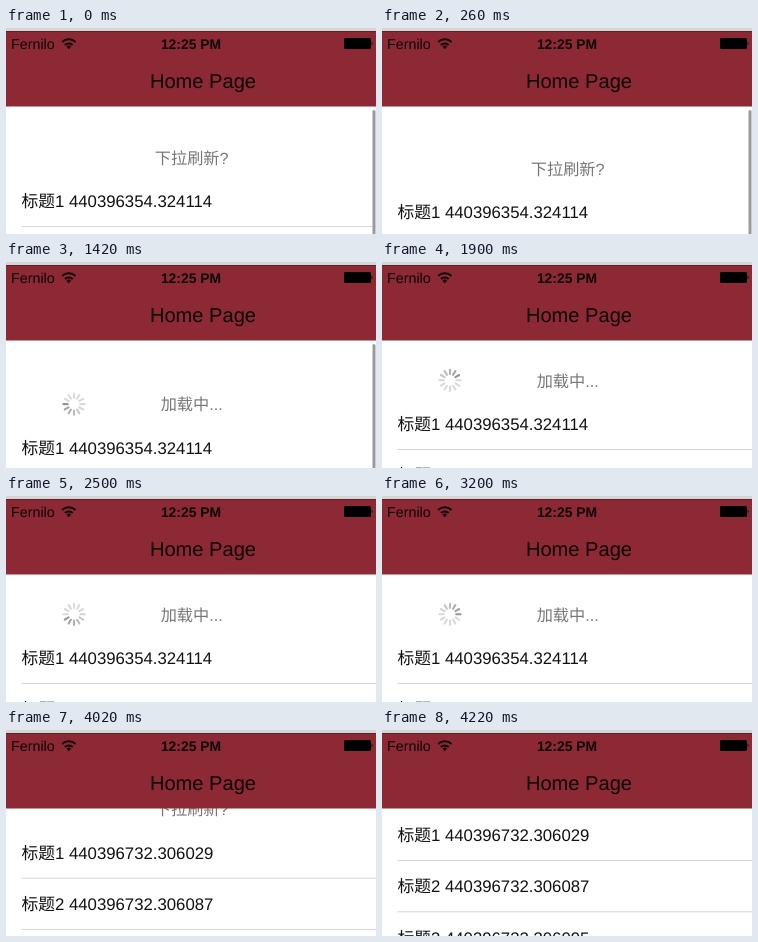
Write an HTML page that moves like this. It is 370 px wide and 206 px high and loops after 4240 ms.

```html
<!DOCTYPE html>
<html lang="zh">
<head>
<meta charset="utf-8">
<title>Pull to refresh</title>
<style>
  html, body { margin: 0; width: 100%; height: 100%; overflow: hidden; background: #fff; }
  svg { display: block; width: 100vw; height: 100vh; }
  text { font-family: "Liberation Sans", "Noto Sans CJK SC", "Noto Sans CJK", sans-serif; text-rendering: geometricPrecision; }
  .row text { font-size: 16.75px; fill: #111; }
  .row path { stroke: #d6d6d8; }
  #hint { font-size: 16.2px; fill: #777; text-anchor: middle; }
  #spinner line { stroke: #4a4a4a; stroke-width: 2.1; stroke-linecap: round; }
</style>
</head>
<body>
<svg viewBox="0 0 370 206">
  <rect width="370" height="206" fill="#fff"/>
  <g id="list">
    <text id="hint" x="185.7" y="67.5"></text>
    <g id="spinner" transform="translate(68 61.3)"></g>
  </g>
  <rect id="bar" x="366.5" y="82" width="3" height="140" rx="1.5" fill="#9a9a9a"/>

  <rect width="370" height="78.5" fill="#8d2935"/>
  <rect width="370" height="3" fill="#d6d4d4"/>
  <rect y="3" width="370" height="1" fill="#5c2229"/>
  <g fill="#0c0405">
    <text x="5" y="21" font-size="14.3">Fernilo</text>
    <text x="185" y="21" font-size="13.9" font-weight="700" text-anchor="middle">12:25 PM</text>
    <text x="197" y="60" font-size="20.1" text-anchor="middle">Home Page</text>
    <g transform="translate(-.2 .6)">
      <path d="M63 20.6l-2.3-2.6a3.3 3.3 0 0 1 4.6 0z"/>
      <g fill="none" stroke="#0c0405" stroke-width="2">
        <path d="M59.1 16.4a5.6 5.6 0 0 1 7.8 0"/>
        <path d="M56.3 13.4a9.6 9.6 0 0 1 13.4 0"/>
      </g>
    </g>
    <rect x="338" y="10" width="27" height="11" rx="1.5" fill="#000"/>
    <path d="M365.6 13.6q2 1.9 0 3.8z"/>
  </g>
</svg>
<script>
const LOOP = 4240, RELEASE = 1410, DONE = 3810;
const PITCH = 51.3, SPOKES = 12, SPOKE_MS = 100;
const DRAG = [[0, 68], [540, 91], [620, 93], [880, 97]];
const OLD = ["440396354.324114", "440396354.324172", "440396354.324180"];
const NEW = ["440396732.306029", "440396732.306087", "440396732.306095"];

const $ = id => document.getElementById(id);
const clamp = x => Math.min(1, Math.max(0, x));
const mix = (a, b, p) => a + (b - a) * p;

function add(parent, tag, attrs) {
  const el = document.createElementNS("http://www.w3.org/2000/svg", tag);
  for (const key in attrs) el.setAttribute(key, attrs[key]);
  return parent.appendChild(el);
}

const titles = OLD.map((_, i) => {
  const row = add($("list"), "g", { class: "row", transform: `translate(0 ${i * PITCH})` });
  add(row, "path", { d: "M15.5 130.5H370" });
  return add(row, "text", { x: 15.5, y: 111 });
});

const spokes = Array.from({ length: SPOKES }, (_, i) =>
  add($("spinner"), "line", { y1: -6.3, y2: -10.6, transform: `rotate(${i * 360 / SPOKES})` }));

function dragOffset(t) {
  for (let i = 1; i < DRAG.length; i++) {
    const [t0, a] = DRAG[i - 1], [t1, b] = DRAG[i];
    if (t < t1) return mix(a, b, (t - t0) / (t1 - t0));
  }
  return DRAG[DRAG.length - 1][1];
}

function offset(t) {
  if (t < RELEASE) return dragOffset(t);
  if (t < DONE) return mix(57, 81, (1 - clamp((t - 1420) / 340)) ** 2);
  const p = clamp((t - 3800) / 355);
  return 57 * (1 + Math.cos(Math.PI * p)) / 2;
}

function draw(t) {
  const loading = t >= RELEASE && t < DONE;
  const data = t < DONE ? OLD : NEW;
  $("list").setAttribute("transform", `translate(0 ${offset(t).toFixed(2)})`);
  $("hint").textContent = loading ? "加载中..." : "下拉刷新?";
  titles.forEach((el, i) => el.textContent = `标题${i + 1} ${data[i]}`);
  $("bar").setAttribute("opacity", 1 - clamp((t - 1680) / 210));

  $("spinner").setAttribute("visibility", loading ? "visible" : "hidden");
  const head = 2 + Math.floor((t - 1900) / SPOKE_MS);
  spokes.forEach((el, i) => {
    const age = (((head - i) % SPOKES) + SPOKES) % SPOKES;
    el.setAttribute("opacity", Math.max(0.2, 0.58 - age * 0.07));
  });
}

const start = performance.now();
function tick() {
  draw((performance.now() - start) % LOOP);
  requestAnimationFrame(tick);
}
tick();
</script>
</body>
</html>
```
